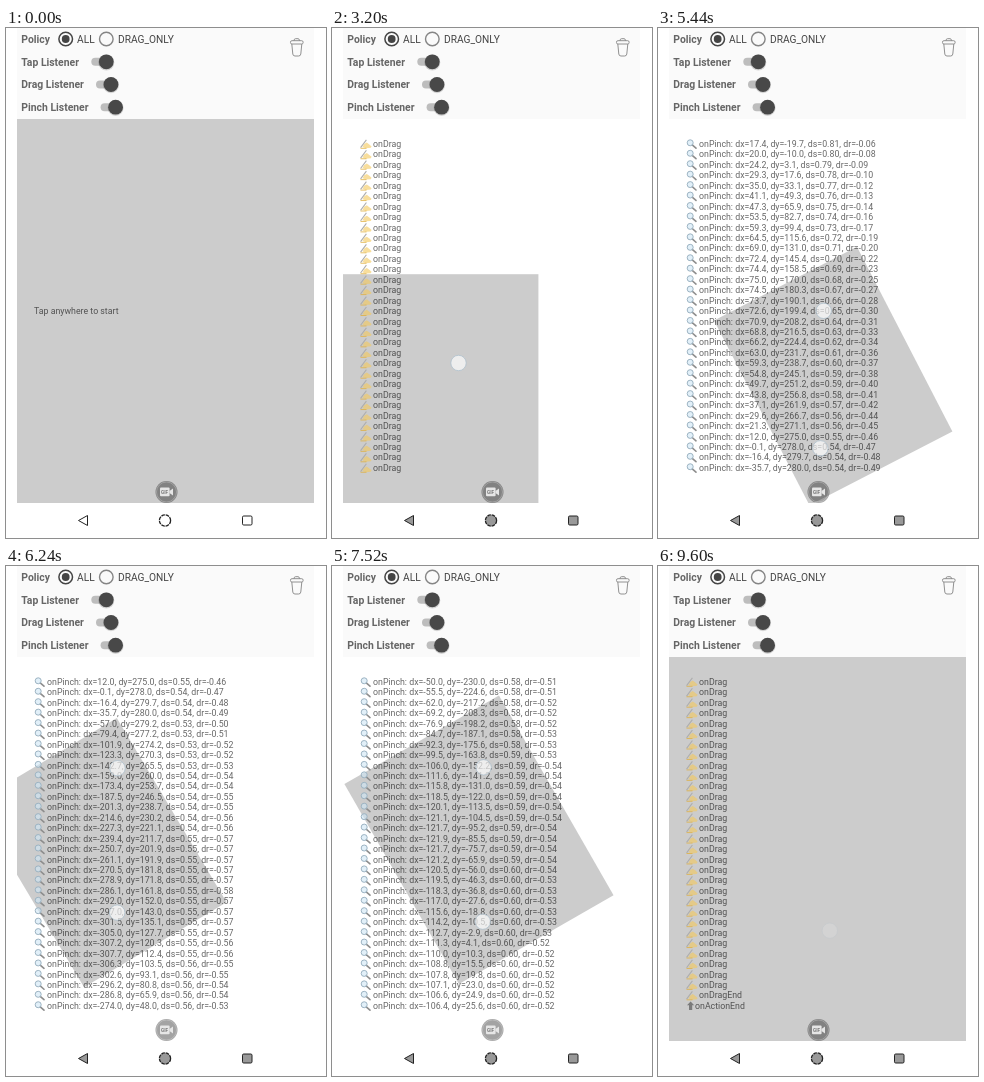
Animation, 320 px wide and 510 px high, one loop 9760 ms. Source, as an HTML page:

```html
<!DOCTYPE html>
<html lang="en">
<head>
<meta charset="utf-8">
<title>Gesture listener demo</title>
<style>
  html, body { margin: 0; width: 100%; height: 100%; overflow: hidden; background: #fff; }
  svg { display: block; width: 320px; height: 510px; font-family: Roboto, sans-serif; }
  .label { font-size: 10.4px; font-weight: 700; fill: #666; }
  .option { font-size: 10.2px; fill: #444; }
  .log { font-size: 8.8px; fill: #000; fill-opacity: .6; white-space: pre; }
  .touch { fill: #fff; fill-opacity: .66; stroke: #a9bccb; stroke-opacity: .7; }
</style>
</head>
<body>
<svg viewBox="0 0 320 510">
  <defs>
    <clipPath id="area"><rect x="11" y="91" width="297" height="384"/></clipPath>
    <g id="hand">
      <path d="M30.5 3.2 32.2.2 34.8-1.2 37 .4 39.6 2.6 38.8 4 34 4.4z" fill="#f3c85a"/>
      <path d="M28.6 3.8 34.4-4" stroke="#adadad" stroke-width="1.1"/>
      <path d="M28.5 4.5h6" stroke="#e0b040" stroke-width=".8"/>
    </g>
    <g id="lens">
      <path d="M34.2 1.1 38 4.4" stroke="#8d8d8d" stroke-width="1.6" stroke-linecap="round"/>
      <circle cx="32.2" cy="-1" r="3" fill="#cfe6f5" stroke="#9db4c3"/>
    </g>
    <path id="down" d="M31-4.2h3.2V.4h2L32.6 4.2 29 .4h2z" fill="#444"/>
    <path id="up" d="M31 4.2h3.2V-.4h2L32.6-4.2 29-.4h2z" fill="#444"/>
    <g id="switch">
      <rect x="-15" y="-4" width="20" height="8" rx="4" fill="#bdbdbd"/>
      <circle cy=".7" r="8" fill="#000" opacity=".15"/>
      <circle r="7.4" fill="#484848"/>
    </g>
  </defs>

  <rect x="11" width="297" height="91" fill="#fafafa"/>
  <g class="label">
    <text x="15.3" y="14.8">Policy</text>
    <text x="15.3" y="37.6">Tap Listener</text>
    <text x="15.3" y="60.4">Drag Listener</text>
    <text x="15.3" y="83.1">Pinch Listener</text>
  </g>
  <g class="option">
    <text x="71" y="14.8">ALL</text>
    <text x="112" y="14.8">DRAG_ONLY</text>
  </g>
  <circle cx="59.7" cy="11" r="6.8" fill="none" stroke="#444" stroke-width="1.5"/>
  <circle cx="59.7" cy="11" r="3.9" fill="#444"/>
  <circle cx="100.3" cy="11" r="6.8" fill="none" stroke="#858585" stroke-width="1.4"/>
  <use href="#switch" x="100.3" y="33.8"/>
  <use href="#switch" x="105" y="56.5"/>
  <use href="#switch" x="109.6" y="79.2"/>
  <g fill="none" stroke="#858585" stroke-width=".9">
    <path d="M285.8 16 286.8 26Q287 28 289 28H292.6Q294.6 28 294.8 26L295.8 16"/>
    <rect x="284.5" y="12.7" width="12.6" height="3.3" rx="1.4"/>
    <path d="M288 12.7Q288 10.7 289.5 10.7H292Q293.5 10.7 293.5 12.7"/>
  </g>

  <g clip-path="url(#area)">
    <rect id="view" x="-148.5" y="-192" width="297" height="384" fill="#ccc"/>
    <g id="log" class="log"></g>
  </g>

  <circle cx="160.5" cy="464" r="11" fill-opacity=".36"/>
  <circle cx="160.5" cy="464" r="10" fill="none" stroke="#fff" stroke-opacity=".3" stroke-width=".8"/>
  <rect x="154" y="459.5" width="9.6" height="8.8" rx="1" fill="#e6e6e6"/>
  <path d="M163.5 463 167 460.5V467.5L163.5 465z" fill="#e6e6e6"/>
  <text x="155" y="465.8" font-size="4.6" font-weight="700" fill="#777">GIF</text>

  <circle id="a" class="touch" r="7.7"/>
  <circle id="b" class="touch" r="7.7"/>

  <g id="nav" stroke="#222">
    <path d="M72.5 492.5 81.5 487.5V497.5z"/>
    <circle cx="159" cy="492.5" r="5.6" stroke-width="1.3" stroke-dasharray="3.6 .8"/>
    <rect x="236.5" y="488" width="9.5" height="9" rx="1.2"/>
  </g>
</svg>
<script>
const FIRST = 800, STEP = 160, LOOP = 9760, END = 56;
const ROWS = 32, LINE = 10.45, CX = 159.5, CY = 283;
const VIEW_LAG = 0.25, TOUCH_LEAD = 0.2;   // in steps
const PINCH = 94, PINCH_END = 227;         // log lines

// step, x, y of the one-finger drag
const dragKeys = [[1, 0, 0], [7, -25, 12], [16, -101, 155], [21.5, 18.5, -16]];

// the pinch, by event number: path, scale, turn
const pathKeys = [
  [0, 0, 0], [5, 14, -16], [14, 16, -28], [18, 20, -10], [30, 75, 170], [45, 12, 275],
  [54, -159, 260], [66, -292, 152], [76, -274, 48], [84, -30, -200], [91, -50, -230],
  [102, -118.5, -122], [122, -106.4, 25.6]
];
const scaleKeys = [[0, 1], [14, .84], [45, .55], [60, .545], [122, .6]];
const turnKeys = [[0, 0], [14, -.03], [45, -.46], [64, -.575], [84, -.5], [102, -.54], [122, -.52]];

const clamp = (v, lo, hi) => Math.min(hi, Math.max(lo, v));
const $ = id => document.getElementById(id);

// Hermite curve through all columns, coming to rest on the last key
function curve(keys, t) {
  t = clamp(t, keys[0][0], keys[keys.length - 1][0]);
  const i = Math.max(0, keys.findIndex(key => key[0] >= t) - 1);
  const p = keys[i], q = keys[i + 1], before = keys[i - 1] || p, after = keys[i + 2];
  const h = q[0] - p[0], u = (t - p[0]) / h;
  return p.slice(1).map((v, n) => {
    const c = n + 1, w = q[c];
    const m0 = (w - before[c]) / (q[0] - before[0]) * h;
    const m1 = after ? (after[c] - v) / (after[0] - p[0]) * h : 0;
    return v + u * (m0 + u * (3 * (w - v) - 2 * m0 - m1 + u * (2 * (v - w) + m0 + m1)));
  });
}

const pinch = n => [pathKeys, scaleKeys, turnKeys].flatMap(keys => curve(keys, n));

// A slow start, then a steady stream of events
const lineCount = k => k < 7 ? 13 * k / 7 : 13 + 277 * (k - 7) / 49;

function pose(k) {
  const [x, y] = curve(dragKeys, k);
  const [dx, dy, s, r] = pinch(lineCount(k) - PINCH - 1);
  const u = clamp((k - 45) / 10, 0, 1), late = u * u * (3 - 2 * u);
  return { x: CX + x + .29 * dx + 21 * late, y: CY + y + .29 * dy + 9 * late, s, r };
}

const dragBegin = ["hand", "onDragBegin", 41], dragEnd = ["hand", "onDragEnd", 41];
const events = {
  0: ["", "-".repeat(14), 28],
  1: ["down", "onActionBegin", 37],
  2: dragBegin,
  [PINCH - 1]: dragEnd,
  [PINCH]: ["lens", "onPinchBegin", 41],
  [PINCH_END]: ["lens", "onPinchEnd", 41],
  [PINCH_END + 1]: dragBegin,
  288: dragEnd,
  289: ["up", "onActionEnd", 37]
};

function lineAt(i) {
  if (events[i]) return events[i];
  if (i < PINCH || i > PINCH_END) return ["hand", "onDrag", 41];
  const [dx, dy, ds, dr] = pinch(i - PINCH);
  return ["lens", `onPinch: dx=${dx.toFixed(1)}, dy=${dy.toFixed(1)}, ds=${ds.toFixed(2)}, dr=${dr.toFixed(2)}`, 41];
}

function make(tag, parent) {
  return parent.appendChild(document.createElementNS("http://www.w3.org/2000/svg", tag));
}

const rows = Array.from({ length: ROWS }, () => {
  const g = make("g", $("log"));
  return { g, icon: make("use", g), text: make("text", g) };
});

function setRow(row, y, [icon, text, x]) {
  row.g.setAttribute("transform", `translate(0 ${y})`);
  row.icon.setAttribute("href", "#" + icon);
  row.text.setAttribute("x", x);
  row.text.setAttribute("y", 3.1);
  row.text.textContent = text;
}

function drawLog(k) {
  const total = Math.round(lineCount(k));
  const shown = Math.min(total, ROWS), top = CY - shown / 2 * LINE;
  rows.forEach((row, i) => {
    row.g.style.display = i < Math.max(shown, 1) ? "" : "none";
    if (i < shown) setRow(row, top + i * LINE, lineAt(total - shown + i));
  });
  if (!total) setRow(rows[0], CY, ["", "Tap anywhere to start", 28]);
}

// Fingers stay on fixed points of the view
function setTouch(el, p, lx, ly, opacity) {
  const c = Math.cos(p.r) * p.s, s = Math.sin(p.r) * p.s;
  el.setAttribute("cx", p.x + lx * c - ly * s);
  el.setAttribute("cy", p.y + lx * s + ly * c);
  el.style.opacity = opacity;
}

function draw(k) {
  const released = k === END;
  const p = released ? pose(0) : pose(k - VIEW_LAG);
  $("view").setAttribute("transform",
    `translate(${p.x} ${p.y}) rotate(${p.r * 180 / Math.PI}) scale(${p.s})`);
  const finger = pose(k + TOUCH_LEAD);
  setTouch($("a"), finger, 67, -102, k >= 1 && k < 45 ? 1 : 0);
  setTouch($("b"), finger, -62, 120.5, released ? .2 : k >= 22 ? 1 : 0);
  $("nav").setAttribute("fill", k ? "#999" : "#fff");
  drawLog(k);
}

let last = -1;
const start = performance.now();
function tick() {
  const t = (performance.now() - start) % LOOP;
  const k = t < FIRST ? 0 : 1 + Math.floor((t - FIRST) / STEP);
  if (k !== last) draw(last = k);
  requestAnimationFrame(tick);
}
tick();
</script>
</body>
</html>
```
